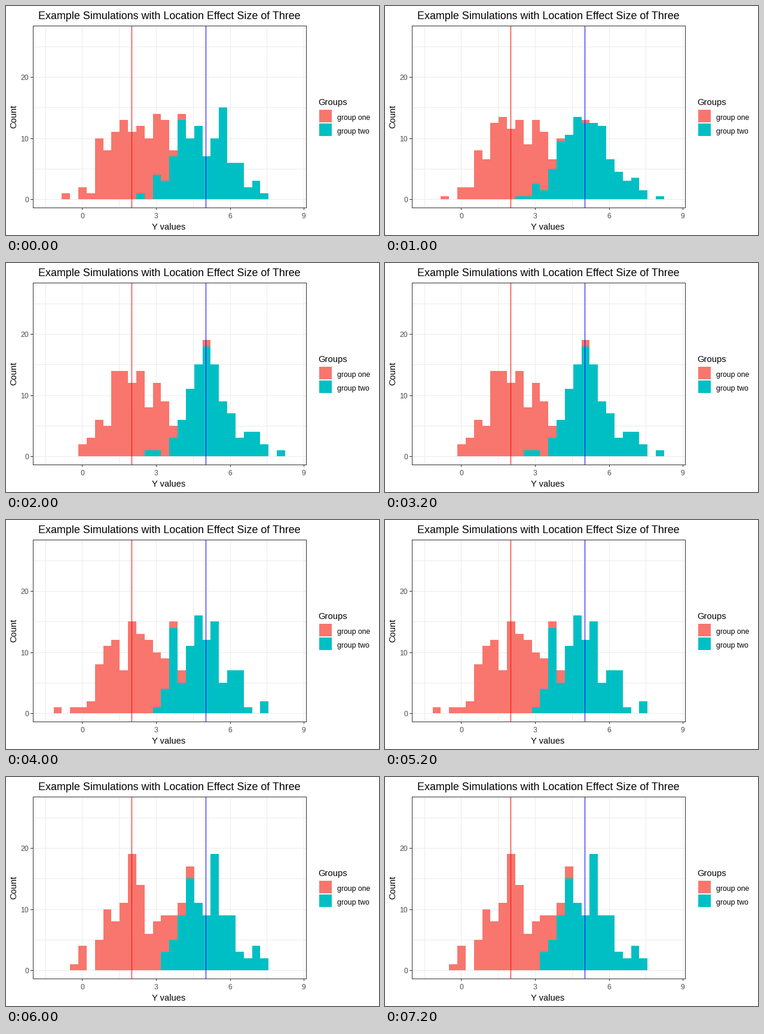
A matplotlib script that plays this animation: 624 by 384 pixels, repeating every 8000 ms.

```python
import numpy as np
import matplotlib.pyplot as plt
from matplotlib.animation import FuncAnimation
from matplotlib.patches import Rectangle

W, H, DPI = 624, 384, 96
PINK, TEAL, GRID, DARK = "#F8766D", "#00BFC4", "#EBEBEB", "#333333"
BINS, BIN_X, BIN_W = 28, 79.6, 13.835
BASE, UNIT = 324, 10.25
LEFT, TOP, RIGHT, BOTTOM = 45, 33, 502, 338

plt.rcParams["font.family"] = "Liberation Sans"
fig = plt.figure(figsize=(W / DPI, H / DPI), dpi=DPI, facecolor="white")
ax = fig.add_axes([0, 0, 1, 1])
ax.set_xlim(0, W)
ax.set_ylim(H, 0)
ax.axis("off")


def rect(x0, y0, x1, y1, color, z=1):
    patch = Rectangle((x0, y0), x1 - x0, y1 - y0, facecolor=color,
                      linewidth=0, antialiased=False, zorder=z)
    return ax.add_patch(patch)


def hline(y, x0, x1, color, z=1):
    rect(x0, y, x1, y + 1, color, z)


def vline(x, y0, y1, color, z=1):
    rect(x, y0, x + 1, y1, color, z)


def label(x, y, text, px, color="black", ha="left", **kw):
    ax.text(x, y, text, fontsize=px * 72 / DPI, color=color, ha=ha,
            va=kw.pop("va", "baseline"), **kw)


def counts(start, values):
    out = np.zeros(BINS)
    out[start:start + len(values)] = values
    return out


# Each sample: (group one, group two), counts per bin; group one sits on top.
samples = [
    (counts(1, [1, 0, 2, 1, 10, 8, 11, 13, 11, 11, 10, 10, 10, 1, 1]),
     counts(10, [1, 0, 4, 3, 7, 13, 10, 12, 7, 10, 15, 6, 6, 2, 3, 1])),
    (counts(3, [2, 3, 6, 5, 14, 14, 12, 14, 7, 11, 9, 2, 0, 0, 0, 1]),
     counts(11, [1, 1, 0, 3, 6, 11, 15, 18, 15, 9, 7, 3, 4, 4, 2, 0, 1])),
    (counts(0, [1, 0, 1, 1, 2, 8, 11, 12, 7, 15, 13, 12, 9, 5, 1, 2]),
     counts(12, [1, 4, 14, 5, 11, 16, 12, 15, 5, 7, 7, 1, 0, 2])),
    (counts(2, [1, 4, 0, 5, 10, 8, 11, 19, 14, 6, 8, 6, 4, 2, 2]),
     counts(13, [3, 5, 9, 15, 11, 9, 19, 9, 9, 3, 2, 4, 2])),
]

# Position along the samples for each second; 0.5 is halfway between two.
steps = [0, 0.5, 1, 1, 2, 2, 3, 3]

# Grid, axes and ticks
for x in (66, 189, 313, 436):
    vline(x, TOP, BOTTOM, GRID)
for y in (68, 170, 273):
    hline(y, LEFT, RIGHT, GRID)
for x, text in zip((128, 251, 375, 498), "0369"):
    vline(x - 1 if text == "0" else x, TOP, BOTTOM, GRID)
    vline(x - 1 if text == "0" else x, BOTTOM, BOTTOM + 4, DARK)
    label(x, 356, text, 12, "#4D4D4D", "center")
for y, text in ((324, "0"), (222, "10"), (119, "20")):
    hline(y, LEFT, RIGHT, GRID)
    hline(y, LEFT - 4, LEFT, DARK)
    label(38, y + 5, text, 12.3, "#4D4D4D", "right")

vline(210, TOP, BOTTOM, "#FF0000", 4)
vline(334, TOP, BOTTOM, "#0000FF", 4)
for y in (TOP, BOTTOM):
    hline(y, LEFT, RIGHT + 1, DARK, 5)
for x in (LEFT, RIGHT):
    vline(x, TOP, BOTTOM + 1, DARK, 5)

# Titles and legend
label(273.3, 22, "Example Simulations with Location Effect Size of Three",
      17.9, ha="center")
label(272.5, 375, "Y values", 14.6, ha="center")
label(20, 185.5, "Count", 14.8, ha="right", va="center", rotation=90,
      rotation_mode="default")
label(522.5, 166, "Groups", 14.8)
for y, color, text in ((174, PINK, "group one"), (197, TEAL, "group two")):
    rect(524, y, 545, y + 21, color)
    label(554.5, y + 17, text, 12.3)

# Bars
edges = np.round(BIN_X + BIN_W * np.arange(BINS + 1))
pairs = list(zip(edges[:-1], edges[1:]))
ones = [rect(a, BASE, b, BASE, PINK, 2) for a, b in pairs]
twos = [rect(a, BASE, b, BASE, TEAL, 3) for a, b in pairs]


def set_bars(bars, heights):
    for bar, h in zip(bars, heights):
        top = np.floor(BASE - h * UNIT + 0.5)
        bar.set_y(top)
        bar.set_height(BASE - top)
        bar.set_visible(h > 0)


def draw(i):
    pos = steps[i]
    k = int(pos)
    t = pos - k
    one, two = samples[k]
    if t:
        next_one, next_two = samples[k + 1]
        one = one + (next_one - one) * t
        two = two + (next_two - two) * t
    set_bars(ones, np.where(one > 0, one + two, 0))
    set_bars(twos, two)
    return ones + twos


anim = FuncAnimation(fig, draw, frames=len(steps), interval=1000,
                     init_func=lambda: draw(0), repeat=True,
                     repeat_delay=0, blit=False)
plt.show()
```
